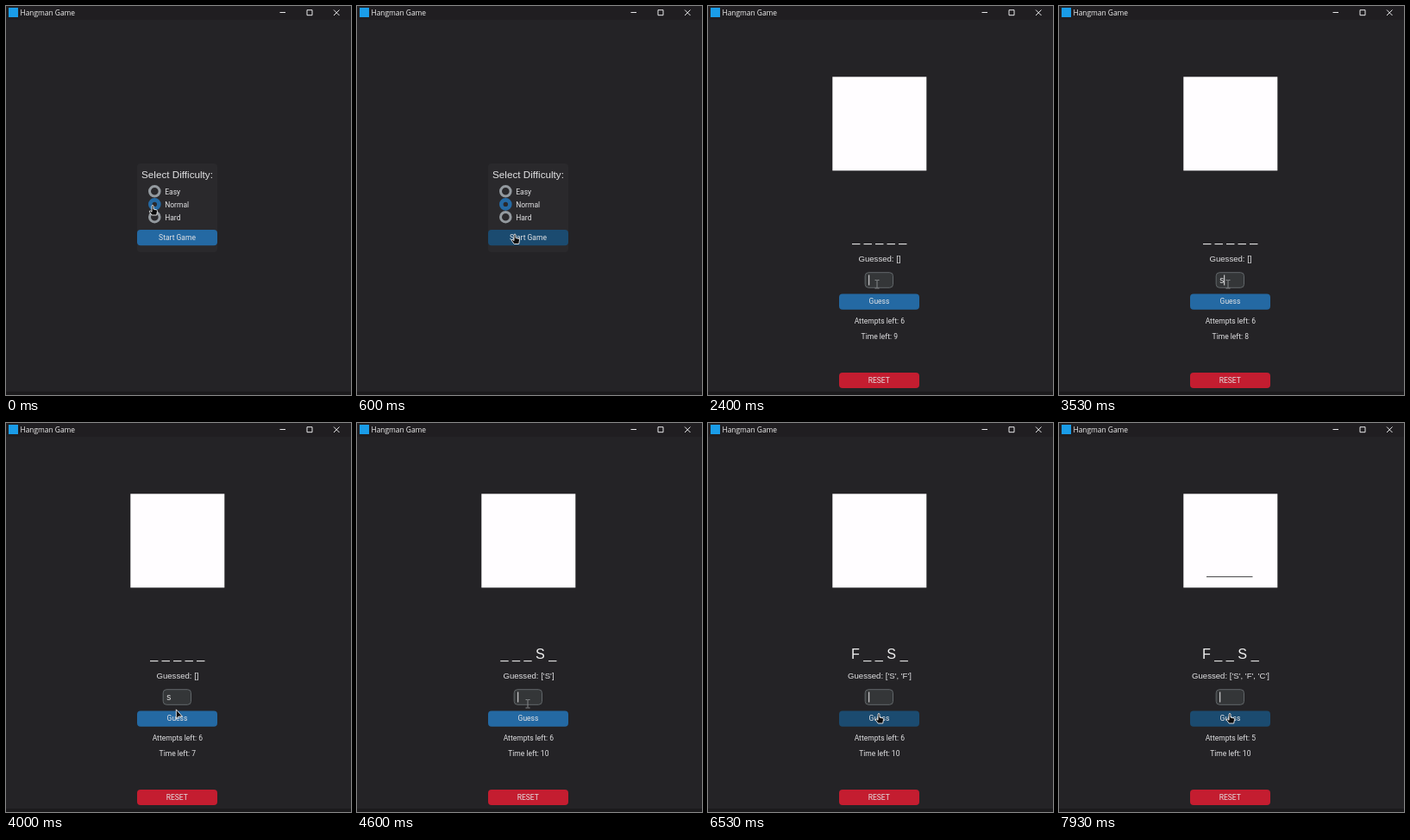
An HTML page that plays this animation: 400x452 px, repeating every 8000 ms.

```html
<!DOCTYPE html>
<html lang="en">
<head>
<meta charset="utf-8">
<title>Hangman Game</title>
<style>
  html, body { margin: 0; width: 100%; height: 100%; overflow: hidden; background: #242326; }
  svg { display: block; width: 400px; height: 452px; }
  text { fill: #e2e2e4; font: 8.5px Roboto, sans-serif; }
  .mid { text-anchor: middle; }
  .arial { font-family: "Liberation Sans", Arial, sans-serif; }
  .blue { fill: #2469a3; }
  .blue.hover { fill: #1b4b70; }
  .ring { fill: none; stroke: #949a9f; stroke-width: 3; }
  .line { fill: none; stroke: #e8e8ea; stroke-width: 1; }
  .pointer { fill: #0b0b0c; stroke: #f2f2f2; stroke-width: .9; stroke-linejoin: round; }
</style>
</head>
<body>
<svg viewBox="0 0 400 452">
  <rect width="400" height="452" fill="#242326"/>
  <rect width="400" height="16" fill="#201e21"/>
  <rect y="448" width="400" height="4" fill="#1b1a1c"/>
  <rect x="3" y="2" width="11" height="11" fill="#1a9ce8"/>
  <text x="16.5" y="10.7" style="font: 8.4px 'Open Sans', sans-serif; fill: #f0f0f0">Hangman Game</text>
  <path class="line" d="M317.5 7.5h6.5M349 4.7h6v6h-6zM380 4.5l6.5 6.5M386.5 4.5l-6.5 6.5"/>

  <g id="menu">
    <rect x="152" y="183" width="93" height="103" rx="4" fill="#2a292c"/>
    <text class="mid arial" x="198.5" y="200" style="font-size: 11.7px">Select Difficulty:</text>
    <circle class="ring" cx="172.3" cy="215.3" r="5.8"/>
    <circle class="ring" cx="172.3" cy="245.2" r="5.8"/>
    <circle class="ring" cx="172.3" cy="230.4" r="5" style="stroke: #2469a3; stroke-width: 4.6"/>
    <text x="184.2" y="218.5">Easy</text>
    <text x="184.2" y="233.5">Normal</text>
    <text x="184.2" y="248.5">Hard</text>
    <rect id="start" class="blue" x="152" y="260" width="93" height="18.3" rx="4"/>
    <text class="mid" x="198.5" y="272">Start Game</text>
  </g>

  <g id="game">
    <rect x="144.3" y="82.3" width="109" height="109" fill="#fffdff"/>
    <path id="gallows" d="M171 178.7h53.5" stroke="#3c3c3e"/>
    <text id="word" class="mid arial" x="198.8" y="274.3" style="font-size: 16.2px; fill: #f0f0f0"></text>
    <text id="guessed" class="mid arial" x="199" y="297" style="font-size: 9.6px"></text>
    <rect x="182.2" y="309.7" width="32.3" height="17.6" rx="4" fill="#343638" stroke="#62676a"/>
    <text id="typed" class="arial" x="186.3" y="322" style="font-size: 10px"></text>
    <path id="caret" class="line" d="M186.7 312.5v12"/>
    <rect id="guess" class="blue" x="152" y="334.5" width="93" height="18.3" rx="4"/>
    <text class="mid" x="198.5" y="346.3">Guess</text>
    <text id="attempts" class="mid" x="198.8" y="368.7"></text>
    <text id="time" class="mid" x="198.8" y="387.3"></text>
    <rect x="152" y="426" width="93" height="18" rx="4" fill="#c41d30"/>
    <text class="mid" x="198.3" y="437.6">RESET</text>
  </g>

  <g id="cursor">
    <path id="arrow" class="pointer" d="M0 0V10.6L2.7 8.3 7 8z"/>
    <path id="hand" class="pointer" d="M-1 1.2Q0-.4 1 1.2V5L4.4 5.8Q5.6 6.2 5.5 7.6L4.7 12H-.8L-3.6 8.2Q-4 6.8-2.6 7L-1 8.2z"/>
    <path id="beam" d="M-2.5-4.5H-.6L0-4 .6-4.5H2.5M0-4V4.5M-2.5 5H-.6L0 4.5 .6 5H2.5" fill="none" stroke="#85888a"/>
  </g>
</svg>
<script>
const LOOP = 8000, FPS = 15, GAME_START = 930;
const el = id => document.getElementById(id);
const show = (id, on) => el(id).style.display = on ? "" : "none";

// Pointer stops: time, x, y
const path = [
  [70, 170, 231], [600, 183, 264.5], [1000, 183, 264.5], [1730, 196, 323],
  [3800, 196, 323], [4130, 198, 338], [4420, 198, 338], [4590, 198, 326],
  [5500, 198, 326], [5870, 198, 337]
];
const rounds = [
  { at: GAME_START, word: "_ _ _ _ _", guessed: "[]", attempts: 6 },
  { at: 4390, word: "_ _ _ S _", guessed: "['S']", attempts: 6 },
  { at: 6130, word: "F _ _ S _", guessed: "['S', 'F']", attempts: 6 },
  { at: 7530, word: "F _ _ S _", guessed: "['S', 'F', 'C']", attempts: 5 }
];
// Entry contents with the advance that shifts the caret
const entries = [
  { at: 1860, text: "", width: 0 },
  { at: 3260, text: "s", width: 5 },
  { at: 4390, text: "", width: 0 },
  { at: 5330, text: "f", width: 2.8 },
  { at: 6130, text: "", width: 0 },
  { at: 7060, text: "c", width: 5 },
  { at: 7530, text: "", width: 0 }
];
const latest = (list, t) => list.filter(item => item.at <= t).pop();

function pointerAt(t) {
  const next = path.findIndex(stop => stop[0] > t);
  if (next === 0) return path[0].slice(1);
  if (next < 0) return path[path.length - 1].slice(1);
  const [t0, x0, y0] = path[next - 1], [t1, x1, y1] = path[next];
  const p = (t - t0) / (t1 - t0), k = p * p * (3 - 2 * p);
  return [x0 + (x1 - x0) * k, y0 + (y1 - y0) * k];
}

function render(t) {
  const playing = t >= GAME_START;
  const [x, y] = pointerAt(t);
  const onStart = !playing && y >= 260;
  const onGuess = playing && y >= 334.5;
  const onEntry = playing && y >= 310 && y < 328;
  const onHand = onStart || onGuess || (!playing && y < 253);

  show("menu", !playing);
  show("game", playing);
  el("start").classList.toggle("hover", onStart);
  el("guess").classList.toggle("hover", onGuess);
  el("cursor").setAttribute("transform", `translate(${x} ${y})`);
  show("hand", onHand);
  show("beam", onEntry);
  show("arrow", !onHand && !onEntry);
  if (!playing) return;

  const round = latest(rounds, t);
  el("word").textContent = round.word;
  el("guessed").textContent = "Guessed: " + round.guessed;
  el("attempts").textContent = "Attempts left: " + round.attempts;
  el("time").textContent = "Time left: " + (10 - Math.floor((t - round.at) / 1000));
  show("gallows", round.attempts < 6);

  const entry = latest(entries, t);
  el("typed").textContent = entry ? entry.text : "";
  show("caret", entry && (t - entry.at) % 900 < 600);
  if (entry) el("caret").setAttribute("transform", `translate(${entry.width} 0)`);
}

function tick() {
  const t = performance.now() % LOOP;
  render(Math.floor(t * FPS / 1000 + .06) * 1000 / FPS);
  requestAnimationFrame(tick);
}
tick();
</script>
</body>
</html>
```
